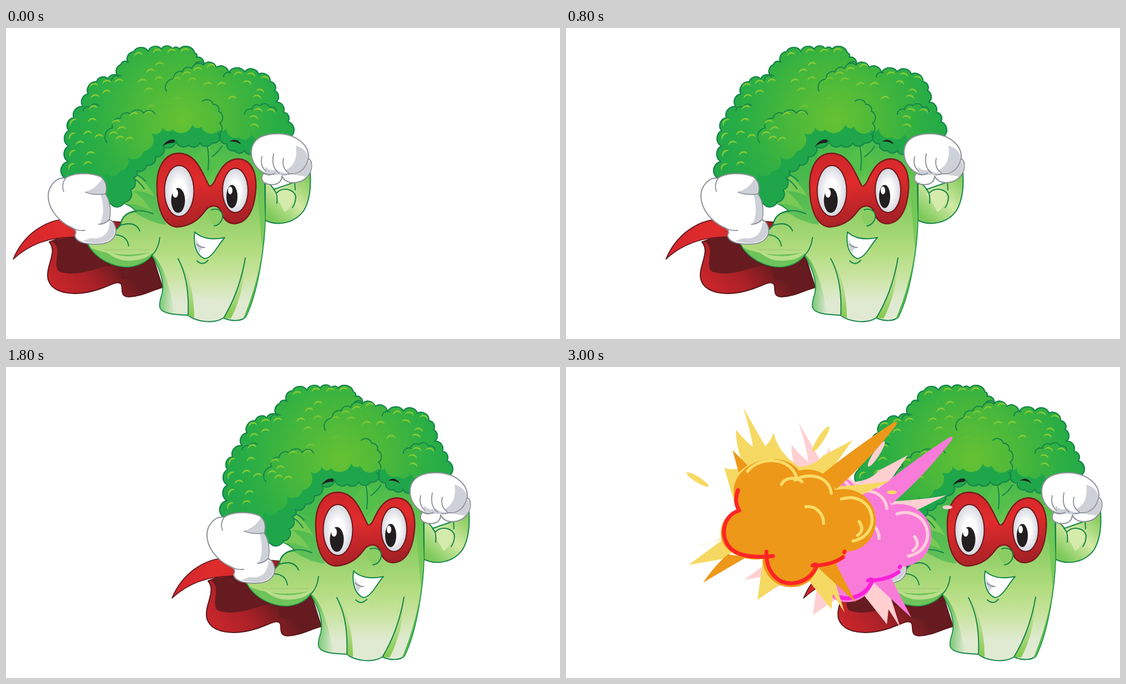
An HTML page that plays this animation: 998x561 px, repeating every 3200 ms.

```html
<!DOCTYPE html>
<html lang="en">
<head>
<meta charset="utf-8">
<title>Super broccoli</title>
<style>
html, body { margin: 0; width: 100%; height: 100%; overflow: hidden; background: #fff; }
svg { display: block; width: 998px; height: 561px; }
path, ellipse { stroke-linecap: round; stroke-linejoin: round; }
.line { fill: none; stroke: #16864a; stroke-width: 2; }
.edge { stroke: #16864a; stroke-width: 2; }
.glove { fill: #fff; stroke: #8c9098; stroke-width: 2; }
.crease { fill: none; stroke: #8c9098; stroke-width: 1.8; }
.grey { fill: #cfd1d8; }
.lit { fill: #84ca36; }
.ray { fill: var(--pale); }
.main { fill: var(--main); }
.shine { fill: none; stroke: var(--shine); stroke-width: 7; }
.rim { fill: none; stroke: var(--rim); stroke-width: 7; }
.fire { --pale: #f6d963; --main: #ed9819; --shine: #f9dc66; --rim: #ff2525; }
.pink { --pale: #ffcfd2; --main: #f97bd9; --shine: #ffcfd9; --rim: #fb20dc; }
</style>
</head>
<body>
<svg viewBox="0 0 998 561">
<defs>
  <radialGradient id="leaf" gradientUnits="userSpaceOnUse" cx="318" cy="165" r="205">
    <stop offset="0" stop-color="#66c233"/><stop offset=".4" stop-color="#4ab83a"/>
    <stop offset=".8" stop-color="#2aae45"/><stop offset="1" stop-color="#23a949"/>
  </radialGradient>
  <linearGradient id="stem" gradientUnits="userSpaceOnUse" x1="0" y1="200" x2="0" y2="525">
    <stop offset="0" stop-color="#43b849"/><stop offset=".2" stop-color="#5ec24e"/>
    <stop offset=".43" stop-color="#93d069"/><stop offset=".62" stop-color="#b2dc7f"/>
    <stop offset=".76" stop-color="#c9e4a0"/><stop offset=".9" stop-color="#e0ead2"/>
  </linearGradient>
  <linearGradient id="arm" gradientUnits="userSpaceOnUse" x1="545" y1="270" x2="480" y2="345">
    <stop offset="0" stop-color="#84cb5c"/><stop offset=".5" stop-color="#d2e9a4"/><stop offset="1" stop-color="#7dc95a"/>
  </linearGradient>
  <linearGradient id="side" x1="0" x2="1">
    <stop offset="0" stop-color="#45b649"/><stop offset="1" stop-color="#45b649" stop-opacity="0"/>
  </linearGradient>
  <linearGradient id="fold" x1="0" y1="0" x2="0" y2="1">
    <stop offset="0" stop-color="#b5dc82" stop-opacity=".3"/><stop offset="1" stop-color="#82c94c"/>
  </linearGradient>
  <linearGradient id="capeTop" x1="0" x2="1">
    <stop offset="0" stop-color="#d4262c"/><stop offset=".45" stop-color="#e02c2d"/><stop offset="1" stop-color="#8c1d22"/>
  </linearGradient>
  <linearGradient id="capeLow" x1="0" y1=".9" x2="1" y2=".4">
    <stop offset="0" stop-color="#d0262b"/><stop offset=".35" stop-color="#a92127"/><stop offset=".65" stop-color="#651b1f"/>
  </linearGradient>
  <linearGradient id="mask" gradientUnits="userSpaceOnUse" x1="350" y1="225" x2="375" y2="358">
    <stop offset="0" stop-color="#cf262a"/><stop offset=".4" stop-color="#e02b2c"/><stop offset="1" stop-color="#a22025"/>
  </linearGradient>
  <radialGradient id="eye">
    <stop offset=".4" stop-color="#fff"/><stop offset="1" stop-color="#d4d5de"/>
  </radialGradient>
  <clipPath id="crownClip"><path data-use="crown"/></clipPath>
  <clipPath id="bodyClip"><use href="#body"/></clipPath>
  <path id="glint" d="M-8,4C-7-6 7-6 8,3C3-2-4-2-8,4Z"/>

  <g id="burst">
    <path class="ray" d="M285,182Q302,188 321,180Q306,145 306,113Q324,135 337,144Q330,105 319,73L359,143Q370,132 374,118Q382,155 420,180Q448,178 463,160L516,132L478,186L490,215Q550,212 586,204Q545,225 520,237L440,300L320,300ZM221,357L284,310L233,324Q262,318 290,305L310,320L290,345ZM345,420L355,345L386,392ZM425,370L478,437L481,410L502,443L476,360L440,350Z"/>
    <ellipse class="ray" cx="237" cy="203" rx="23" ry="5" transform="rotate(32 237 203)"/>
    <ellipse class="ray" cx="459" cy="130" rx="27" ry="5.5" transform="rotate(-57 459 130)"/>
    <ellipse class="ray" cx="587" cy="226" rx="9" ry="3.5"/>
    <path class="main" d="M300,150L327,177L311,190ZM463,192Q535,135 592,99Q600,97 594,106Q545,170 487,220ZM247,389Q270,355 292,338L325,343ZM452,360L522,425L484,350Z"/>
    <path class="main" d="M303,235C295,195 335,164 375,166C400,167 412,178 420,187C450,179 479,196 485,222C525,213 558,240 558,277C558,310 535,331 506,333C500,353 475,364 452,363C446,387 426,398 403,397C375,396 354,372 354,346C325,352 280,335 279,303C278,279 292,262 309,260C304,252 303,243 303,235Z"/>
    <path class="rim" d="M310,222Q302,242 312,259C280,268 276,312 300,330Q320,346 373,341M361,333C360,368 380,392 409,390Q437,387 450,363Q454,352 444,358Q478,358 499,343M501,334L502,333"/>
    <path class="shine" stroke-width="6" d="M327,188C349,160 405,162 415,199M388,212C394,198 416,198 425,207M412,204C440,188 474,198 478,228M432,252C451,250 464,265 464,282M496,238C528,228 555,251 551,282Q545,308 517,314M528,279Q539,294 525,304" style="stroke-width:5.5"/>
  </g>
</defs>

<g id="hero">
  <path d="M78,386C94,405 70,430 76,454C84,480 125,485 165,472C190,464 203,454 208,463C211,472 205,484 221,485C245,484 262,473 282,468L262,405L200,352L120,370Z" fill="url(#capeLow)" stroke="#5a181c" stroke-width="2"/>
  <path d="M82,384C104,397 82,425 95,439C120,449 152,438 174,431C196,425 206,431 207,452L280,464L262,410L190,378L126,375Z" fill="#651b1f"/>
  <path d="M13,417C31,373 70,347 106,345Q160,345 218,351L195,390Q150,378 122,377C78,377 42,390 13,417Z" fill="url(#capeTop)" stroke="#5a181c" stroke-width="1.6"/>

  <path class="edge" d="M467,272L483,291L520,278L524,262L548,260C550,290 547,312 536,330C520,352 490,358 467,347Z" fill="url(#arm)"/>
  <path d="M489,295C501,287 516,291 519,304Q514,325 502,332Q492,312 483,300Z" fill="#d5ebac"/>
  <path class="line" d="M482,291Q490,298 488,316M488,297C500,286 519,291 522,304Q522,315 516,324M520,278L521,292"/>

  <path id="body" class="edge" d="M240,250L212,316Q226,321 235,331C216,332 208,343 206,356L185,378L147,390C163,418 195,432 222,431Q248,428 263,410C278,436 286,460 281,480Q276,495 277,503C280,516 305,517 328,518C340,529 373,535 392,523C405,529 424,530 432,521C455,475 466,390 467,345L466,265L442,195L300,195Z" fill="url(#stem)"/>
  <g clip-path="url(#bodyClip)">
    <path d="M225,250L290,210L275,290L288,355Q248,350 212,316Z" fill="#36b24a" opacity=".55"/>
    <path d="M232,264Q254,278 268,304Q248,293 229,294Q247,305 262,330Q235,315 214,318Q226,290 232,264Z" fill="#78c955"/>
    <path d="M262,408Q288,425 304,517L270,520Z" fill="url(#side)"/>
    <path d="M140,390Q190,418 265,404L245,438L160,432Z" fill="#54bb4a" opacity=".75"/>
    <path d="M175,399Q215,423 267,402Q250,423 210,419Q190,414 175,399Z" fill="#b9df8b"/>
    <path d="M310,416Q331,455 328,518L339,523Q339,455 310,416ZM431,415Q421,475 392,523L405,524Q429,480 431,415Z" fill="url(#fold)"/>
    <path d="M468,340Q463,440 427,525L436,525Q460,470 474,360Z" fill="#4fb94b"/>
    <path d="M462,270L468,350L462,400Q455,330 453,285Z" fill="#6cc653" opacity=".7"/>
    <path d="M365,208Q350,220 342,235L364,270L388,236Q370,225 365,208Z" fill="#54bf49"/>
  </g>
  <path class="line" d="M310,416Q331,455 328,518M431,415Q421,475 392,523M277,378Q275,398 263,410M206,356C209,332 234,323 265,335M206,356Q233,347 241,366M197,373Q218,374 221,393M361,210Q367,225 364,256M389,213Q382,225 371,232M228,263Q242,265 251,276M229,271Q240,276 249,290"/>
  <path d="M176,400H258" stroke="#9bc078" stroke-width="1"/>

  <path data-use="crown" class="edge" fill="url(#leaf)"/>
  <g clip-path="url(#crownClip)">
    <path id="shade" fill="#1fa64a"/>
  </g>
  <path data-use="crown" class="line"/>
  <path id="ridges" class="line"/>
  <g id="glints" class="lit"></g>

  <path d="M272,287C271,252 285,226 312,226C344,227 353,261 366,285Q371,286 376,276C386,253 397,237 418,236C444,237 452,264 450,292C447,330 434,352 411,353Q395,352 389,335C385,318 368,316 357,332C344,350 326,358 307,359C283,356 272,324 272,287Z" fill="url(#mask)" stroke="#7c191d" stroke-width="2.4"/>
  <g stroke="#6d171b" stroke-width="2" fill="url(#eye)">
    <ellipse cx="312" cy="294" rx="26.5" ry="46"/><ellipse cx="413" cy="293" rx="23" ry="40"/>
  </g>
  <g fill="#231f20">
    <ellipse cx="310" cy="311" rx="12.5" ry="22.5"/><ellipse cx="407" cy="304" rx="10" ry="21"/>
    <path d="M281,214Q290,200 302,201Q307,204 302,207Q290,207 281,214ZM402,205Q411,199 417,203Q422,206 423,210Q415,204 402,205Z"/>
  </g>
  <g fill="#fff"><ellipse cx="305" cy="298" rx="5" ry="8"/><ellipse cx="404" cy="293" rx="4" ry="7"/></g>

  <path d="M364,330C382,320 393,332 389,345Q384,357 375,356Q364,347 364,330Z" fill="#89cd63"/>
  <path class="line" d="M370,328C385,323 393,334 389,346Q384,356 375,357"/>
  <path class="edge" d="M340,368C355,382 375,382 394,378C381,392 373,414 358,416C343,411 337,390 340,368Z" fill="#fff"/>
  <path class="grey" d="M342,376Q343,391 358,396Q348,398 349,407Q341,395 342,376Z"/>
  <path class="crease" d="M343,390Q350,396 358,396"/>
  <path class="line" d="M344,420Q354,430 364,419"/>

  <path class="glove" d="M107,271C91,268 76,285 76,303C76,326 94,348 116,359Q130,364 124,374C126,388 150,392 175,389C195,385 202,370 196,356Q193,348 186,346C190,328 187,311 179,300C183,286 179,275 170,268C150,260 120,261 107,271Z"/>
  <path class="grey" d="M143,295Q160,292 173,272Q182,283 178,298Q160,302 143,295ZM171,301L179,301Q189,315 186,346Q177,352 168,355Q180,335 171,301ZM153,379Q185,383 187,349Q199,355 196,370Q190,387 165,388Q148,388 138,384Z"/>
  <path class="crease" d="M107,271Q99,283 104,295M143,296Q161,303 180,299M187,345Q178,354 167,354M116,359Q130,367 142,365"/>

  <path class="glove" d="M464,262Q457,272 465,279Q476,285 488,281Q497,277 497,267Q502,278 516,279C540,280 553,260 550,243Q549,238 545,236Z"/>
  <path class="grey" d="M510,263Q537,260 545,239L550,245Q551,260 541,268Q525,266 510,263Z"/>
  <path class="glove" d="M442,222C444,197 468,189 497,191C525,194 546,212 545,233C541,254 528,264 511,263Q499,267 490,262Q478,266 466,262C451,255 441,240 442,222Z"/>
  <path class="grey" d="M522,212Q542,218 544,234Q540,254 524,261Q510,264 502,257Q527,247 522,212ZM467,250Q476,260 488,255Q493,262 511,262Q490,268 467,262Z"/>
  <path class="crease" d="M461,232Q457,248 468,258M482,227Q477,252 492,262M500,235Q496,253 510,262M464,262Q474,268 484,262"/>
</g>

<g id="boom">
  <use href="#burst" class="pink" x="100" y="27"/>
  <use href="#burst" class="fire"/>
</g>
</svg>
<script>
const $ = id => document.getElementById(id);

// Joins the points with round bumps.
function bumps(text) {
  const pts = text.trim().split(/\s+/).map(p => p.split(',').map(Number));
  return pts.map(([x, y], i) => {
    if (!i) return `M${x},${y}`;
    const r = Math.hypot(x - pts[i - 1][0], y - pts[i - 1][1]) * 0.58;
    return `A${r},${r} 0 0 1 ${x},${y}`;
  }).join('');
}

const crown = bumps(`103,268 112,241 113,213 113,185 122,162 139,142 148,119 163,97
  184,92 203,88 207,66 220,62 230,43 256,42 280,38 300,38 312,38 340,45 343,53 356,66
  379,71 401,81 430,79 455,83 476,97 484,113 486,134 500,152 508,169 514,195
  480,218 445,226 430,220 412,221 398,209 386,192 371,207 349,207 329,211 306,203
  284,214 269,232 253,247 235,257 229,270 224,292 213,314 190,318`) + 'L140,300Z';
document.querySelectorAll('[data-use=crown]').forEach(p => p.setAttribute('d', crown));

$('shade').setAttribute('d', bumps(
  '520,188 442,192 420,197 397,180 384,184 352,178 336,174 300,183 282,179 262,190 248,222 218,232 205,258 180,262'
) + 'L150,340H520Z');

$('ridges').setAttribute('d', [
  '289,114 302,92 318,79 335,73 356,67',
  '354,132 373,138 383,150 385,172 382,192',
  '182,207 192,180 206,163 224,155 248,154 268,155',
  '139,150 152,143 167,140',
  '430,156 443,147 458,140 475,143 487,150',
  '190,95 208,87', '340,66 357,65', '392,88 405,81'
].map(bumps).join(''));

const glints = [
  238,47, 272,41, 298,41, 322,40, 276,65, 260,77, 275,91, 245,95, 257,111, 308,128, 262,142,
  158,103, 181,97, 203,95, 160,123, 181,115, 157,143, 155,166, 120,169, 147,189, 167,195,
  118,194, 133,207, 119,225, 152,226, 117,249, 147,244, 193,190, 208,181, 205,198, 222,200,
  230,155, 257,153, 198,169, 325,82, 345,74, 369,68, 307,92, 335,93, 388,101, 363,101,
  418,82, 442,84, 467,90, 435,98, 458,113, 453,124, 455,148, 478,149, 447,161, 448,176, 407,126
];
for (let i = 0; i < glints.length; i += 2) {
  const [x, y] = glints.slice(i, i + 2);
  const tilt = x < 130 ? -45 : x > 430 ? 14 : -8;
  const fade = Math.min(1, Math.hypot(x - 310, y - 150) / 80);
  $('glints').innerHTML +=
    `<use href="#glint" transform="translate(${x} ${y}) rotate(${tilt})" opacity="${fade}"/>`;
}

// The hero slides in held steps; the burst appears on the last one.
const steps = [0, 45, 82, 118, 142, 167, 191, 215, 246, 263, 286, 306, 319, 341, 358, 386, 415];
function draw(now) {
  const t = now % 3200;
  const step = t < 100 ? 0 : 1 + Math.floor(t / 200);
  $('hero').setAttribute('transform', `translate(${steps[step]} 0)`);
  $('boom').setAttribute('visibility', step === 16 ? 'visible' : 'hidden');
}
const start = performance.now();
(function tick() {
  draw(performance.now() - start);
  requestAnimationFrame(tick);
})();
</script>
</body>
</html>
```
